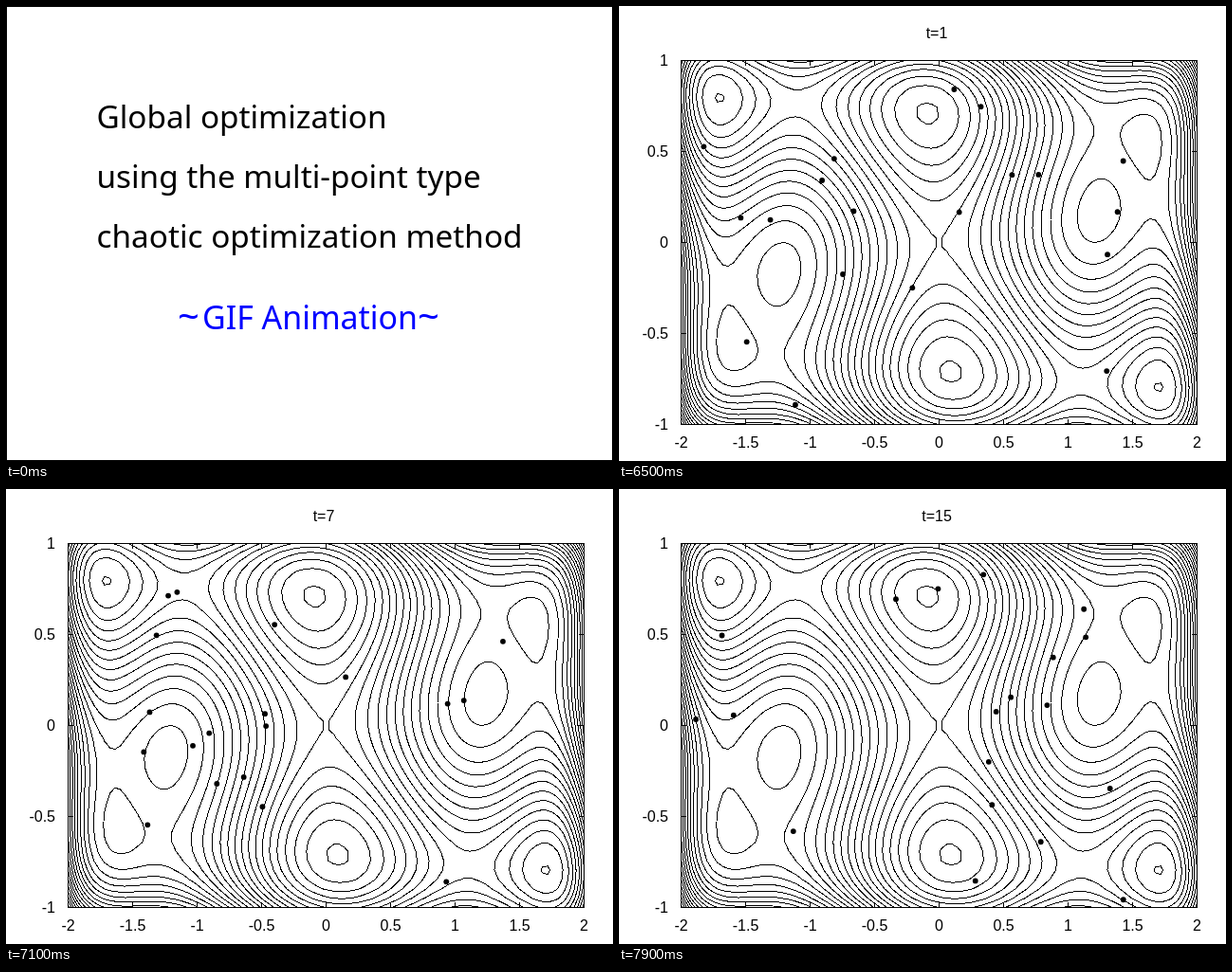
An HTML page that plays this animation: 640 px wide and 480 px high, repeating every 8000 ms.

```html
<!DOCTYPE html>
<html lang="en">
<head>
<meta charset="utf-8">
<title>Chaotic optimization</title>
<style>
  html, body { margin: 0; width: 100%; height: 100%; overflow: hidden; background: #fff; }
  svg { display: block; width: 640px; height: 480px; }
  #title { font: 33.3px "Noto Sans", "Open Sans", sans-serif; }
  #intro { font: 19.5px "Liberation Serif", "Noto Serif", serif; fill: #2c0a0a; }
  #run { font: 16px "Liberation Sans", Arial, sans-serif; }
  .mid { text-anchor: middle; }
  .end { text-anchor: end; }
  .note { font-size: 21.8px; }
</style>
</head>
<body>
<svg viewBox="0 0 640 480" xmlns="http://www.w3.org/2000/svg">
  <g id="title">
    <rect x=".5" y=".5" width="639" height="479" fill="none" stroke="#000"/>
    <text x="95.500" y="128.500">Global optimization</text>
    <text x="95.500" y="191.500">using the multi-point type</text>
    <text x="95.500" y="254.500">chaotic optimization method</text>
    <g fill="#00f">
      <text x="181" y="342" font-size="40">~</text>
      <text x="207" y="341" font-size="33.9">GIF Animation</text>
      <text x="434" y="342" font-size="40">~</text>
    </g>
  </g>
  <g id="intro"></g>
  <g id="run"></g>
</svg>
<script>
const NS = "http://www.w3.org/2000/svg";
const LOOP = 8000, LAST_STEP = 15;
const [title, intro, run] = ["title", "intro", "run"].map(id => document.getElementById(id));

function add(parent, tag, attrs, text) {
  const el = document.createElementNS(NS, tag);
  for (const k in attrs) el.setAttribute(k, attrs[k]);
  if (text !== undefined) el.textContent = text;
  parent.appendChild(el);
  return el;
}

// Six-hump camel function and its two global minima
const camel = (x, y) => (4 - 2.1 * x * x + x ** 4 / 3) * x * x + x * y + (4 * y * y - 4) * y * y;
const optima = [[-0.0898, 0.7126], [0.0898, -0.7126]];

// Plot areas: x spans -2..2, y spans 1..-1
const area = (left, top, w, h) => ({
  left, top, w, h,
  px: x => left + (x + 2) / 4 * w,
  py: y => top + (1 - y) / 2 * h
});
const wide = area(65.5, 8.5, 567, 412);
const main = area(65.5, 57.5, 544, 384);

// Contour segments by linear interpolation over a triangulated grid
function contours(a) {
  const NX = 99, NY = 39, GAP = 0.2;
  const node = (i, j) => {
    const x = -2 + 4 * i / NX, y = -1 + 2 * j / NY;
    return { x: a.px(x), y: a.py(y), z: camel(x, y) };
  };
  let d = "";
  const slice = tri => {
    const zs = tri.map(p => p.z);
    const hi = Math.max(...zs);
    for (let n = Math.ceil(Math.min(...zs) / GAP); n * GAP < hi; n++) {
      const z = n * GAP, cut = [];
      tri.forEach((p, k) => {
        const q = tri[(k + 1) % 3];
        if ((p.z < z) === (q.z < z)) return;
        const s = (z - p.z) / (q.z - p.z);
        cut.push((p.x + s * (q.x - p.x)).toFixed(2) + " " + (p.y + s * (q.y - p.y)).toFixed(2));
      });
      if (cut.length === 2) d += "M" + cut[0] + "L" + cut[1];
    }
  };
  for (let i = 0; i < NX; i++) {
    for (let j = 0; j < NY; j++) {
      const p = node(i, j), q = node(i + 1, j + 1);
      slice([p, node(i + 1, j), q]);
      slice([p, q, node(i, j + 1)]);
    }
  }
  return d;
}

function plot(parent, a, line, labels) {
  const g = add(parent, "g", { fill: "none", ...line });
  add(g, "path", { d: contours(a) });
  let d = `M${a.left} ${a.top}h${a.w}v${a.h}h${-a.w}z`;
  for (let v = -2; v <= 2; v += 0.5) {
    const x = a.px(v);
    d += `M${x} ${a.top}v5M${x} ${a.top + a.h}v-5`;
    add(parent, "text", { x: x + labels.dx, y: labels.base, class: "mid" }, v);
    if (Math.abs(v) > 1) continue;
    const y = a.py(v);
    d += `M${a.left} ${y}h5M${a.left + a.w} ${y}h-5`;
    add(parent, "text", { x: labels.right, y: y + labels.dy, class: "end" }, v);
  }
  add(g, "path", { d });
}

// Initial points; the first five carry arrows
const start = [
  [-0.425, 0.49], [-1.535, 0.41], [-0.485, 0.19], [-1.16, -0.085], [-0.795, -0.19],
  [-1.84, 0.91], [-0.53, 0.9], [-0.4, 0.91], [0.38, 0.95], [0.15, 0.84],
  [0.5, 0.8], [1.735, 0.835], [1.43, 0.555], [0.08, 0.175], [0.425, 0.28],
  [0.99, 0.23], [-0.655, -0.575], [0.8, -0.69], [-0.16, -0.905]
];

// Each step pulls a point inwards and throws it a random distance
function seeded(seed) {
  return () => (seed = seed * 16807 % 2147483647) / 2147483647;
}
const random = seeded(2024);
const fold = (v, max) => Math.abs(v) > max ? Math.sign(v) * 2 * max - v : v;
const hop = (v, max) => fold(0.8 * v + (random() - 0.5) * max, 0.97 * max);
const clouds = [start];
for (let n = 1; n <= LAST_STEP; n++) {
  clouds.push(clouds[n - 1].map(([x, y]) => [hop(x, 2), hop(y, 1)]));
}

// Annotated overview
plot(intro, wide, { stroke: "#555", "stroke-width": 0.5 },
  { dx: 1.5, base: 445.5, right: 54.5, dy: 5 });
for (const [x, y] of start) add(intro, "circle", { cx: wide.px(x), cy: wide.py(y), r: 3 });

function arrow(x, y, [toX, toY]) {
  const dx = wide.px(toX) - x, dy = wide.py(toY) - y;
  const deg = Math.atan2(dy, dx) * 180 / Math.PI;
  const tip = Math.hypot(dx, dy) - 3.5;
  const g = add(intro, "g", { transform: `translate(${x} ${y}) rotate(${deg})` });
  add(g, "path", { d: `M0 0H${tip - 8}`, stroke: "#2c0a0a" });
  add(g, "path", { d: `M${tip} 0l-12 -4.8l3 4.8l-3 4.8z` });
}
arrow(190, 160, start[0]);
arrow(190, 160, start[1]);
arrow(247, 171, start[2]);
arrow(190, 176, start[3]);
arrow(190, 176, start[4]);
arrow(440, 218, optima[0]);
arrow(438, 243, optima[1]);
add(intro, "text", { x: 135, y: 176, class: "note" }, "Initial Points");
add(intro, "text", { x: 434, y: 238, class: "note" }, "Optimal Solution");

function axisName(index, transform) {
  const g = add(intro, "g", { transform });
  add(g, "text", { "font-size": 26, "font-style": "italic" }, "x");
  add(g, "text", { x: 10.5, y: 6, "font-size": 16 }, index);
}
axisName(1, "translate(341 471)");
axisName(2, "translate(23 225) rotate(-90)");

// Running plot
plot(run, main, { stroke: "#000", "stroke-linecap": "round", "shape-rendering": "crispEdges" },
  { dx: 0, base: 466, right: 52, dy: 5 });
const counter = add(run, "text", { x: 335, y: 33.5, class: "mid" });
const dots = start.map(() => add(run, "circle", { r: 2.9 }));

function draw(t) {
  const show = (el, on) => el.setAttribute("display", on ? "inline" : "none");
  show(title, t < 500);
  show(intro, t >= 500 && t < 5500);
  show(run, t >= 5500);
  const step = Math.max(0, Math.floor((t - 6400) / 100));
  counter.textContent = "t=" + step;
  clouds[step].forEach(([x, y], i) => {
    dots[i].setAttribute("cx", main.px(x));
    dots[i].setAttribute("cy", main.py(y));
  });
}

const begin = performance.now();
function tick() {
  draw((performance.now() - begin) % LOOP);
  requestAnimationFrame(tick);
}
tick();
</script>
</body>
</html>
```
